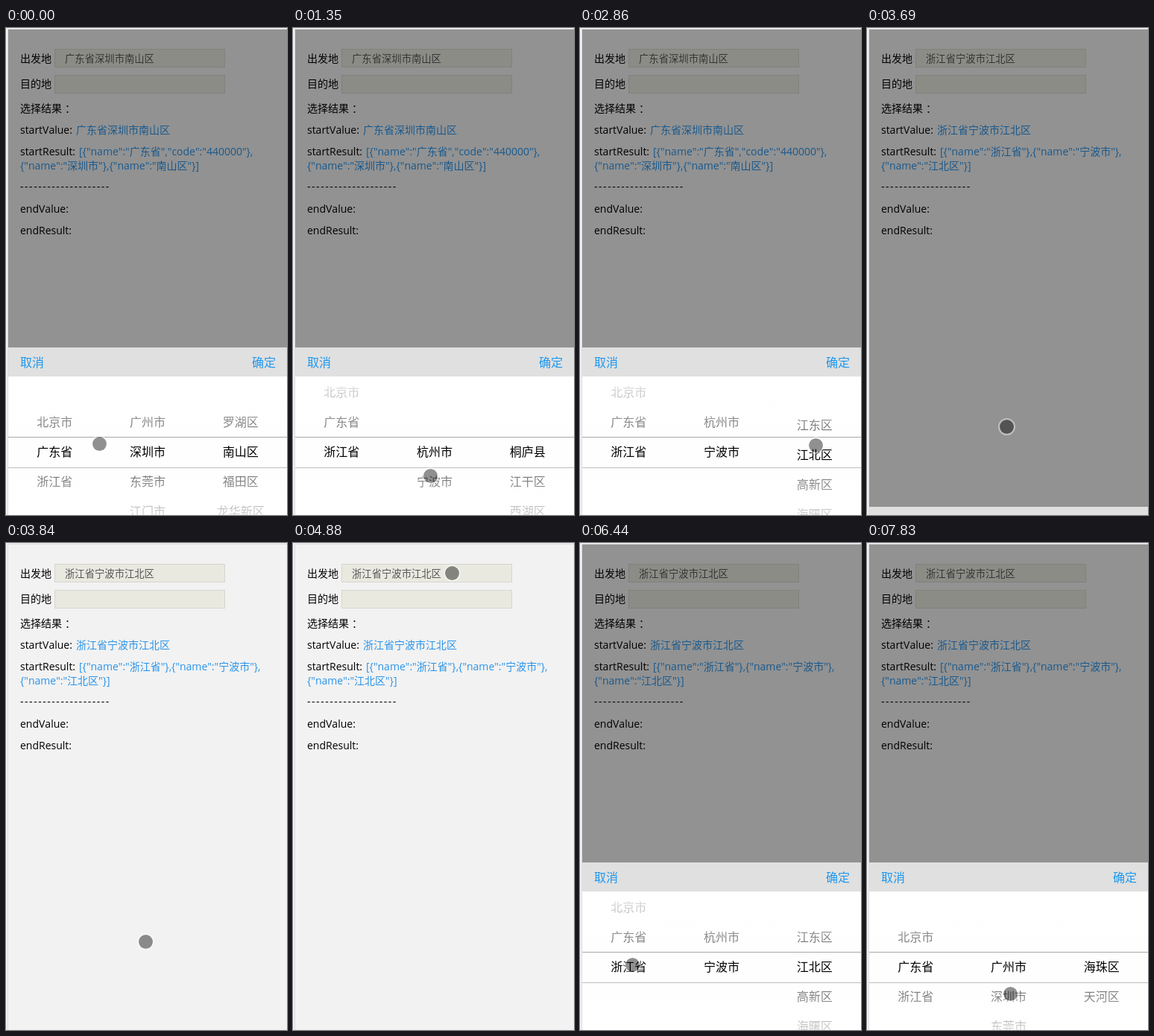
These frames come from a looping animation (377x654 px, 7.99 s). An HTML page:

```html
<!DOCTYPE html>
<html lang="zh-CN">
<head>
<meta charset="utf-8">
<title>Region picker</title>
<style>
  html, body { margin: 0; width: 100%; height: 100%; overflow: hidden; background: #f2f2f2; }
  svg { display: block; width: 377px; height: 654px; }
  text {
    font: 14px "Open Sans", "Noto Sans CJK SC", "Noto Sans CJK", sans-serif;
    font-kerning: none;
    white-space: pre;
  }
  .blue { fill: #2a94ea; }
  .field { fill: #e9e9e0; stroke: #d6d6d0; }
  .value { font-size: 13.333px; fill: #555; }
  .rule { letter-spacing: 1.54px; }
  .action { font-size: 16px; fill: #1e98ee; }
  .wheel text { font-size: 16px; text-anchor: middle; }
</style>
</head>
<body>
<svg viewBox="0 0 377 654">
  <defs>
    <linearGradient id="fadeTop" x2="0" y2="1">
      <stop stop-color="#fff" stop-opacity=".95"/>
      <stop offset="1" stop-color="#fff" stop-opacity=".4"/>
    </linearGradient>
    <linearGradient id="fadeBottom" x2="0" y1="1" y2="0">
      <stop stop-color="#fff" stop-opacity=".95"/>
      <stop offset="1" stop-color="#fff" stop-opacity=".4"/>
    </linearGradient>
    <clipPath id="wheelArea"><rect x="3" y="468" width="374" height="204"/></clipPath>
  </defs>

  <rect width="377" height="654" fill="#f2f2f2"/>
  <path d="M2.5 654V1.5H377" fill="none" stroke="#dcdcdc"/>

  <text x="19" y="46">出发地</text>
  <rect class="field" x="65.5" y="28.5" width="228" height="24"/>
  <text class="value" id="fieldValue" x="79" y="46"></text>
  <text x="19" y="80">目的地</text>
  <rect class="field" x="65.5" y="63.5" width="228" height="24"/>
  <text x="19" y="113">选择结果<tspan dx="4">：</tspan></text>
  <text x="19" y="142">startValue:</text>
  <text class="blue" id="startValue" x="94" y="142"></text>
  <text x="19" y="171">startResult:</text>
  <text class="blue" id="resultHead" x="98" y="171"></text>
  <text class="blue" id="resultTail" x="19" y="190"></text>
  <text class="rule" x="19" y="218">--------------------</text>
  <text x="19" y="248">endValue:</text>
  <text x="19" y="277">endResult:</text>

  <rect id="overlay" x="3" y="2" width="374" height="652" opacity=".4"/>

  <g id="sheet">
    <rect x="3" y="429" width="374" height="243" fill="#fefefe"/>
    <g clip-path="url(#wheelArea)">
      <g class="wheel"></g>
      <g class="wheel"></g>
      <g class="wheel"></g>
    </g>
    <rect x="3" y="468" width="374" height="81" fill="url(#fadeTop)"/>
    <rect x="3" y="591" width="374" height="81" fill="url(#fadeBottom)"/>
    <path d="M3 549.5H377" stroke="#a8a8a8"/>
    <path d="M3 590.5H377" stroke="#bebebe"/>
    <rect x="3" y="429" width="374" height="39" fill="#e0e0e0"/>
    <text class="action" x="19" y="455">取消</text>
    <text class="action" x="330" y="455">确定</text>
  </g>

  <g id="pointer">
    <circle cx=".5" cy=".5" r="9.5" fill-opacity=".43"/>
    <circle cx=".5" cy=".5" r="10.5" fill="none" stroke="#fff" stroke-opacity=".42" stroke-width="2"/>
  </g>
</svg>

<script>
const LOOP = 7990;
const STEP = 135;       // the picture refreshes at this pace
const CLOSE = 3690;
const OPEN = 5310;
const ROW = 40;
const DROP = 225;       // travel of the sheet
const DRAG = 450;       // time the finger drags a wheel
const SETTLE = 560;     // time until that wheel rests

const $ = id => document.getElementById(id);
const wheels = [...document.querySelectorAll('.wheel')];

const provinces = ['北京市', '广东省', '浙江省'];
const cities = {
  广东省: ['广州市', '深圳市', '东莞市', '江门市'],
  浙江省: ['杭州市', '宁波市'],
};
const districts = {
  深圳市: ['罗湖区', '南山区', '福田区', '龙华新区'],
  杭州市: ['桐庐县', '江干区', '西湖区'],
  宁波市: ['江东区', '江北区', '高新区', '海曙区'],
  广州市: ['海珠区', '天河区'],
};

const before = [{ name: '广东省', code: '440000' }, { name: '深圳市' }, { name: '南山区' }];
const after = [{ name: '浙江省' }, { name: '宁波市' }, { name: '江北区' }];

// Regions loaded into the wheels, and the row each wheel starts on.
const scenes = [
  { at: 0, province: '广东省', city: '深圳市', rows: [1, 1, 1] },
  { at: 1050, province: '浙江省', city: '杭州市', rows: [2, 0, 0] },
  { at: 2050, province: '浙江省', city: '宁波市', rows: [2, 1, 0] },
  { at: CLOSE, province: '浙江省', city: '宁波市', rows: [2, 1, 1] },
  { at: OPEN, province: '浙江省', city: '宁波市', rows: [2, 1, 1] },
  { at: 7250, province: '广东省', city: '广州市', rows: [1, 0, 0] },
];

// The pointer travels to a place or drags a wheel by some rows.
const home = { x: 125, y: 558 };
const gestures = [
  { at: 0, ms: 290, x: 86, y: 602 },
  { at: 290, wheel: 0, rows: 1 },
  { at: 950, ms: 370, x: 184, y: 601 },
  { at: 1350, wheel: 1, rows: 1 },
  { at: 2050, ms: 360, x: 316, y: 600 },
  { at: 2410, wheel: 2, rows: 1 },
  { at: 2860, ms: 210, x: 341, y: 450 },
  { at: CLOSE - 1, ms: 1, x: 187, y: 535 },
  { at: 3980, ms: 780, x: 213, y: 40 },
  { at: 5450, ms: 900, x: 70, y: 566 },
  { at: 6440, wheel: 0, rows: -1 },
  { at: 7250, ms: 540, x: 192, y: 605 },
];

function ease(p) {
  const q = Math.min(1, Math.max(0, p));
  return q * q * (3 - 2 * q);
}

function pointerAt(t) {
  return gestures.reduce((pos, g) => {
    const target = g.rows ? { x: pos.x, y: pos.y - g.rows * ROW } : g;
    const p = ease((t - g.at) / (g.ms ?? DRAG));
    return { x: pos.x + (target.x - pos.x) * p, y: pos.y + (target.y - pos.y) * p };
  }, home);
}

function wheelRow(scene, wheel, t) {
  return gestures
    .filter(g => g.wheel === wheel && g.at >= scene.at)
    .reduce((row, g) => row + g.rows * ease((t - g.at) / SETTLE), scene.rows[wheel]);
}

function sheetDrop(t) {
  if (t >= OPEN) return DROP * (1 - ease((t - OPEN + 150) / 450));
  return t < CLOSE ? 0 : DROP * ease((t - CLOSE + 390) / 450);
}

function fillWheel(wheel, column, names) {
  const key = names.join();
  if (wheel.dataset.names === key) return;
  wheel.dataset.names = key;
  const x = 3 + 374 / 3 * (column + .5);
  wheel.innerHTML = names
    .map((name, i) => `<text x="${x}" y="${575 + i * ROW}">${name}</text>`).join('');
}

function showResult(picked) {
  const value = picked.map(region => region.name).join('');
  const json = JSON.stringify(picked);
  const wrap = json.lastIndexOf('},', 36) + 2;
  $('fieldValue').textContent = value;
  $('startValue').textContent = value;
  $('resultHead').textContent = json.slice(0, wrap);
  $('resultTail').textContent = json.slice(wrap);
}

function move(node, x, y) {
  node.setAttribute('transform', `translate(${x} ${y})`);
}

function draw(time) {
  const scene = scenes.findLast(s => s.at <= time);
  const t = scene.at + Math.floor((time - scene.at) / STEP) * STEP;

  showResult(t < CLOSE ? before : after);

  const lists = [provinces, cities[scene.province], districts[scene.city]];
  wheels.forEach((wheel, i) => {
    fillWheel(wheel, i, lists[i]);
    move(wheel, 0, -ROW * wheelRow(scene, i, t));
  });

  const drop = sheetDrop(t);
  move($('sheet'), 0, drop);
  $('overlay').style.display = drop < DROP ? '' : 'none';

  const { x, y } = pointerAt(t);
  move($('pointer'), x, y);
}

const begin = performance.now();
function tick() {
  draw((performance.now() - begin) % LOOP);
  requestAnimationFrame(tick);
}
tick();
</script>
</body>
</html>
```
